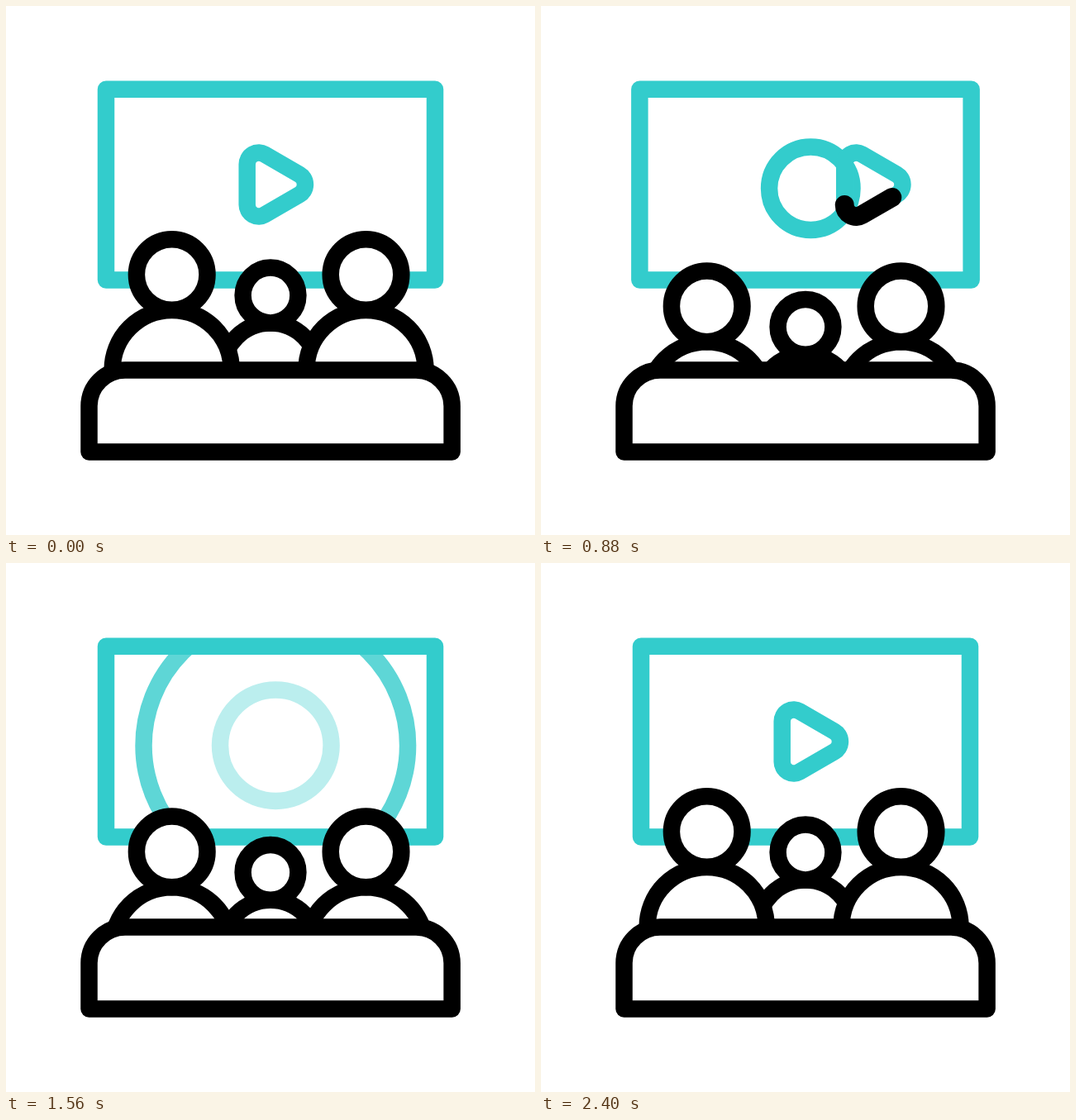
Write an HTML page that moves like this. It is 640 px wide and 640 px high and loops after 2640 ms.

```html
<!DOCTYPE html>
<html lang="en">
<head>
<meta charset="utf-8">
<title>Cinema</title>
<style>
  html, body { margin: 0; width: 100%; height: 100%; overflow: hidden; background: #fff; }
  svg { display: block; width: 100vw; height: 100vh; }
  .line { fill: none; stroke-width: 20.5; stroke-linejoin: round; }
  .teal { stroke: #3cc; }
  .ink { stroke: #000; }
  .solid { fill: #fff; }
</style>
</head>
<body>
<svg viewBox="0 0 640 640">
  <defs>
    <clipPath id="inside"><rect id="hole" y="100.7" height="230.8"/></clipPath>
    <clipPath id="aboveSeat"><rect width="640" height="440"/></clipPath>
    <path id="triangle" pathLength="1" d="M291.7 240.5V191.5A14 14 0 0 1 312.7 179.4L355 203.9A14 14 0 0 1 355 228.1L312.7 252.6A14 14 0 0 1 291.7 240.5Z"/>
  </defs>
  <g clip-path="url(#inside)">
    <circle id="outer" class="line teal" cx="326.3" cy="220.7"/>
    <circle id="inner" class="line teal" cx="326.3" cy="220.7"/>
    <g id="play">
      <use href="#triangle" class="line teal"/>
      <use href="#triangle" id="trace" class="line ink" style="stroke-width:23;stroke-linecap:round"/>
    </g>
  </g>
  <rect id="screen" class="line teal" y="100.7" height="230.8"/>
  <g clip-path="url(#aboveSeat)">
    <g id="crowd" class="line ink solid" style="fill:#fff">
      <circle cx="320" cy="441.5" r="58"/>
      <circle cx="320" cy="350" r="33.4"/>
      <circle cx="200.7" cy="440" r="72"/>
      <circle cx="200.7" cy="325" r="42.8"/>
      <circle cx="435.5" cy="440" r="72"/>
      <circle cx="435.5" cy="325" r="42.8"/>
    </g>
  </g>
  <path class="line ink" style="fill:#fff" d="M100.5 539.6V484A43.6 43.6 0 0 1 144.1 440.4H496A43.6 43.6 0 0 1 539.6 484V539.6Z"/>
</svg>
<script>
const LOOP = 2640, STEP = 40;
const $ = id => document.getElementById(id);
const set = (el, attrs) => { for (const k in attrs) el.setAttribute(k, attrs[k]); };

const linear = u => u;
const smooth = u => u * u * (3 - 2 * u);

// cubic-bezier(.4, 0, .2, 1)
function swift(u) {
  let lo = 0, hi = 1;
  for (let i = 0; i < 24; i++) {
    const s = (lo + hi) / 2, q = 1 - s;
    if (1.2 * s * q * q + 0.6 * s * s * q + s * s * s < u) lo = s; else hi = s;
  }
  return smooth(lo);
}

// Keys are [time, value] pairs.
function track(keys, ease = linear) {
  return t => {
    if (t <= keys[0][0]) return keys[0][1];
    for (let i = 1; i < keys.length; i++) {
      const [t0, a] = keys[i - 1], [t1, b] = keys[i];
      if (t < t1) return a + (b - a) * ease((t - t0) / (t1 - t0));
    }
    return keys[keys.length - 1][1];
  };
}

const widen = track([[240, 0], [640, 20.7], [1000, 0], [1640, 0], [2040, 20.7], [2400, 0]], swift);
const sink = track([[0, 0], [960, 38.5], [1200, 38.5], [2400, 0]], swift);
const leave = track([[600, 0], [1400, 268]], smooth);
const enter = track([[1600, -268], [2400, 0]], smooth);
const head = track([[240, 0], [840, 1]], smooth);
const tail = track([[500, 0], [1100, 1]], smooth);
const rings = [
  ['outer', track([[660, 0], [1120, 105], [1400, 140], [1760, 184.5], [1900, 202]]), track([[1480, 1], [1860, 0]])],
  ['inner', track([[880, 0], [1120, 23.6], [1400, 51.6], [1700, 81]]), track([[1400, 1], [1640, 0]])]
];

function draw(t) {
  const w = widen(t), box = { x: 121 - w, width: 398 + 2 * w };
  set($('screen'), box);
  set($('hole'), box);
  set($('crowd'), { transform: `translate(0 ${sink(t)})` });
  set($('play'), { transform: `translate(${t < 1500 ? leave(t) : enter(t)} 0)` });

  const from = tail(t), len = head(t) - from;
  set($('trace'), {
    'stroke-dasharray': `${len} 2`,
    'stroke-dashoffset': -from,
    visibility: len > 0 ? 'visible' : 'hidden'
  });

  for (const [id, radius, fade] of rings) {
    const r = radius(t);
    set($(id), { r, opacity: r > 0 ? fade(t) : 0 });
  }
}

const start = performance.now();
function tick() {
  const t = (performance.now() - start) % LOOP;
  draw(Math.floor(t / STEP) * STEP);
  requestAnimationFrame(tick);
}
tick();
</script>
</body>
</html>
```
